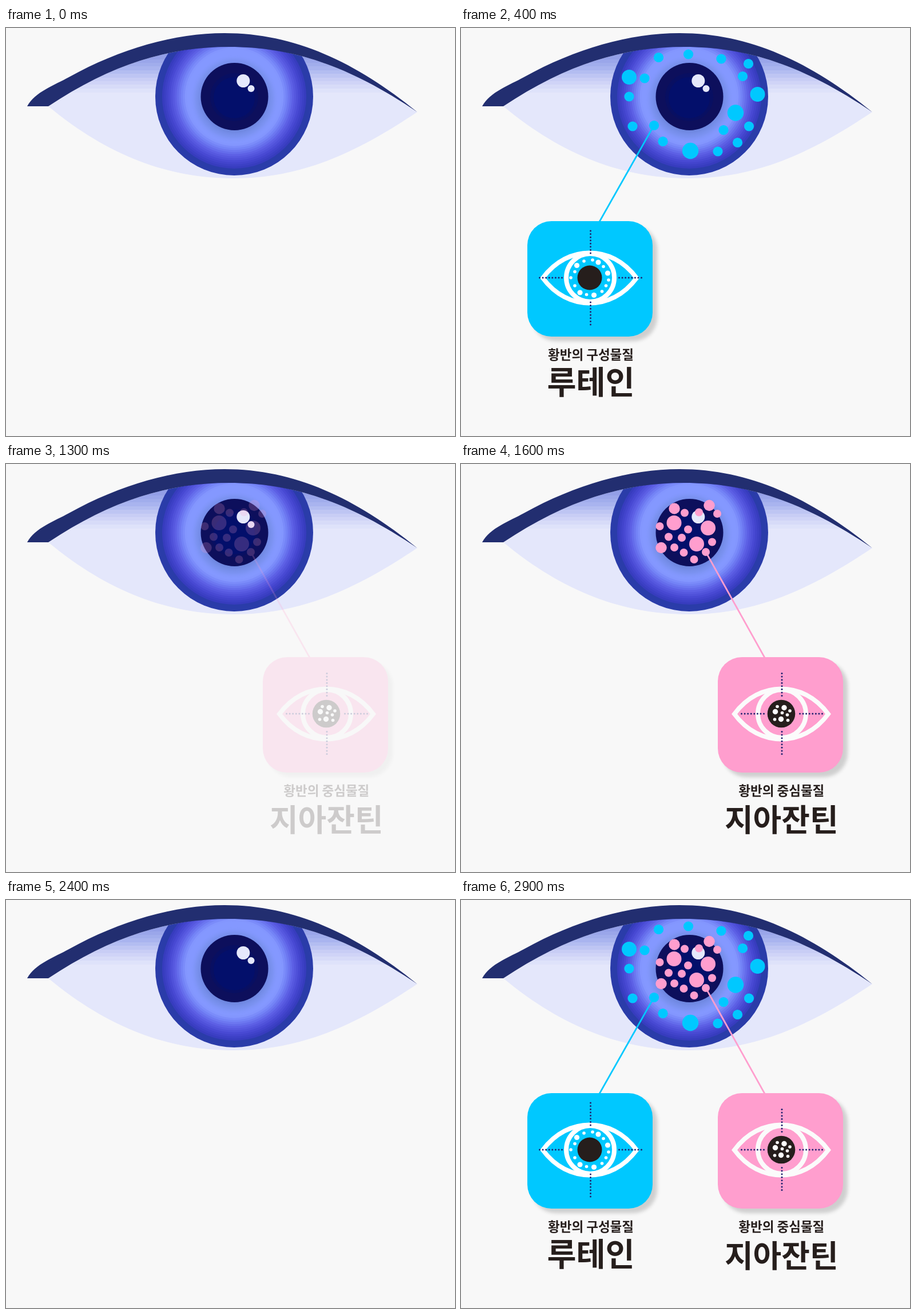
Recreate the animation shown at these times as an HTML page with a canvas. Size 785 px wide and 714 px high, loop 7900 ms.

```html
<!DOCTYPE html>
<html lang="ko">
<head>
<meta charset="utf-8">
<style>
  html, body { margin: 0; width: 100%; height: 100%; overflow: hidden; background: #f8f8f8; }
  canvas { display: block; }
</style>
</head>
<body>
<canvas id="stage" width="785" height="714"></canvas>
<script>
const WIDTH = 785, HEIGHT = 714, LOOP = 7900, STEP = 100;
const CYAN = '#00c8ff', PINK = '#ff9ece', INK = '#261e1c', NAVY = '#222e70';
const EYE = { x: 399, y: 120 };
const INNER_LID = 'C600 66 500 33 390 33 C285 33 185 63 74 137';

function makeLayer(paint) {
  const canvas = document.createElement('canvas');
  canvas.width = WIDTH;
  canvas.height = HEIGHT;
  paint(canvas.getContext('2d'));
  return canvas;
}

function disc(g, x, y, r, color) {
  g.fillStyle = color;
  g.beginPath();
  g.arc(x, y, r, 0, Math.PI * 2);
  g.fill();
}

function discs(g, points, r, color) {
  for (const [x, y] of points) disc(g, x, y, r, color);
}

// Colour at position p along sorted [position, [r, g, b]] stops.
function ramp(stops, p) {
  let i = 1;
  while (i < stops.length - 1 && p > stops[i][0]) i++;
  const [p0, a] = stops[i - 1], [p1, b] = stops[i];
  const k = Math.min(1, Math.max(0, (p - p0) / (p1 - p0)));
  return `rgb(${a.map((v, n) => Math.round(v + (b[n] - v) * k))})`;
}

function paintEye(g) {
  g.fillStyle = '#f8f8f8';
  g.fillRect(0, 0, WIDTH, HEIGHT);

  g.save();
  g.clip(new Path2D(`M719 147 ${INNER_LID} C180 225 285 263 398 263 C515 263 610 220 719 147Z`));
  g.fillStyle = '#e4e7fb';
  g.fillRect(0, 0, WIDTH, HEIGHT);
  const shade = [[48, [143, 156, 230]], [68, [165, 177, 238]], [90, [201, 206, 245]], [114, [228, 231, 251]]];
  for (let y = 29; y < 112; y += 6.4) {
    g.fillStyle = ramp(shade, y + 3);
    g.fillRect(0, Math.round(y), WIDTH, 7);
  }

  disc(g, EYE.x, EYE.y, 138, '#2a3ca9');
  const iris = [[84, [132, 152, 255]], [92, [115, 130, 246]], [103, [92, 95, 228]],
                [115, [69, 70, 208]], [126, [52, 58, 186]]];
  for (let r = 126; r > 82; r -= 3.6) disc(g, EYE.x, EYE.y, r, ramp(iris, r - 1.8));

  const halo = g.createRadialGradient(EYE.x, EYE.y + 4, 56, EYE.x, EYE.y + 4, 78);
  halo.addColorStop(0, 'rgba(104,130,215,.8)');
  halo.addColorStop(.5, 'rgba(116,142,230,.55)');
  halo.addColorStop(1, 'rgba(132,152,255,0)');
  disc(g, EYE.x, EYE.y + 4, 78, halo);
  g.restore();

  disc(g, 399.5, EYE.y, 59, '#0d0f5c');
  disc(g, EYE.x, EYE.y + 1, 42, '#080f62');
  disc(g, EYE.x, EYE.y + 2, 36, '#030f6b');
  disc(g, 414.8, 92.5, 11.5, '#e5e8fc');
  disc(g, 428.5, 106, 6, '#e5e8fc');

  g.fillStyle = NAVY;
  g.fill(new Path2D(`M37 137 C50 112 85 100 110 86 C200 36 295 9 382 9 C505 9 612 60 719 147 ${INNER_LID}Z`));
}

function leader(g, x0, y0, x1, y1, color) {
  g.strokeStyle = color;
  g.lineWidth = 2.7;
  g.beginPath();
  g.moveTo(x0, y0);
  g.lineTo(x1, y1);
  g.stroke();
}

function cardBase(g, x, color) {
  g.save();
  g.shadowColor = 'rgba(0,0,0,.17)';
  g.shadowOffsetX = g.shadowOffsetY = 8;
  g.shadowBlur = 6;
  g.fillStyle = color;
  g.beginPath();
  g.roundRect(x, 338, 219, 202, 42);
  g.fill();
  g.restore();
}

function eyeOutline(g, cx, ringX, color) {
  g.save();
  g.strokeStyle = color;
  g.lineWidth = 8;
  g.translate(cx, 437.5);
  g.stroke(new Path2D('M-82 0 C-60 -30 -30 -44 0 -44 S60 -30 82 0 C60 30 30 44 0 44 S-60 30 -82 0Z'));
  g.restore();
  g.strokeStyle = color;
  g.lineWidth = 8;
  g.beginPath();
  g.arc(ringX, 437, 42, 0, Math.PI * 2);
  g.stroke();
}

// Four dotted arms; near and far are distances from the centre.
function crosshair(g, cx, cy, nearX, nearY) {
  for (let i = 0; i < 8; i++) {
    const dx = nearX + i * 5.57, dy = nearY + i * 5.57;
    discs(g, [[cx - dx, cy], [cx + dx, cy], [cx, cy - dy], [cx, cy + dy]], 1.5, '#20206f');
  }
}

function label(g, text, cx, baseline, size) {
  g.font = `700 ${size}px "Noto Sans CJK KR", "Noto Sans CJK", sans-serif`;
  g.textAlign = 'center';
  g.fillStyle = INK;
  g.fillText(text, cx, baseline);
}

function paintLutein(g) {
  discs(g, [[345.5, 51.5], [397.5, 46], [455, 54], [502.5, 62.5], [321, 88], [492.5, 84.5],
            [294, 120], [300, 172], [337.5, 170.5], [459, 178.5], [503.5, 172], [353, 198.5],
            [483.5, 200.5], [449, 216]], 8.6, CYAN);
  discs(g, [[294, 86], [518.5, 116]], 13, CYAN);
  discs(g, [[480, 148.5], [401, 215]], 14.2, CYAN);
  leader(g, 337, 171, 242, 339, CYAN);
  cardBase(g, 116, CYAN);
  eyeOutline(g, 225, 226, '#fff');
  disc(g, 225, 437, 21.5, INK);
  discs(g, [[215, 408], [230, 406], [249, 417.5], [199, 426.5], [258, 441], [192, 437],
            [199, 451], [253.5, 451], [246.5, 461], [219.5, 466.5]], 2.8, '#fff');
  discs(g, [[202.5, 415.5], [240, 410], [256.5, 429], [208, 463], [232.5, 467.5]], 4.6, '#fff');
  crosshair(g, 226.5, 437, 50, 43);
  crosshairCaption(g, '황반의 구성물질', '루테인', 227, 640, 55.5);
}

function paintZeaxanthin(g) {
  discs(g, [[391, 85.5], [416, 84.5], [448, 87], [347.5, 109], [397, 114.5], [363, 127.5],
            [386, 129], [439, 136.5], [373, 146], [389.5, 155], [428, 154], [407.5, 167]], 7, PINK);
  discs(g, [[373, 78], [434, 72.5], [350, 146.5]], 9.7, PINK);
  discs(g, [[372.5, 103], [432, 112], [412, 140]], 13, PINK);
  leader(g, 428, 154, 531, 339, PINK);
  cardBase(g, 449, PINK);
  eyeOutline(g, 560, 561, '#fbfbfb');
  disc(g, 560, 437, 24.3, INK);
  discs(g, [[553, 424.5], [575, 432], [561.5, 435.5], [570.5, 439], [548.5, 447], [571.5, 448.5]], 2.8, '#fff');
  discs(g, [[565, 426.5], [549.5, 433.5], [559.5, 446.5]], 4.7, '#fff');
  crosshair(g, 561, 437, 31.5, 31.5);
  crosshairCaption(g, '황반의 중심물질', '지아잔틴', 560.3, 643, 54);
}

function crosshairCaption(g, small, big, cx, baseline, size) {
  label(g, small, cx, 580, 22.5);
  label(g, big, cx, baseline, size);
}

// Opacity per 100 ms tick; values hold between ticks and after the last one.
const RISE = [.2, .47, .73, 1], FALL = [.8, .53, .27, 0], FINALE = [.2, .4, .6, .8, 1];
const luteinFades = [[100, RISE], [900, FALL], [2500, FINALE]];
const zeaxanthinFades = [[1300, RISE], [2100, FALL], [2500, FINALE]];

function opacity(fades, t) {
  let value = 0;
  for (const [start, levels] of fades) {
    if (t >= start) value = levels[Math.min(levels.length - 1, Math.floor((t - start) / STEP))];
  }
  return value;
}

const eye = makeLayer(paintEye);
const groups = [[makeLayer(paintLutein), luteinFades], [makeLayer(paintZeaxanthin), zeaxanthinFades]];
const stage = document.getElementById('stage').getContext('2d');

function draw() {
  const t = performance.now() % LOOP;
  stage.globalAlpha = 1;
  stage.drawImage(eye, 0, 0);
  for (const [layer, fades] of groups) {
    stage.globalAlpha = opacity(fades, t);
    stage.drawImage(layer, 0, 0);
  }
  requestAnimationFrame(draw);
}
draw();
</script>
</body>
</html>
```
